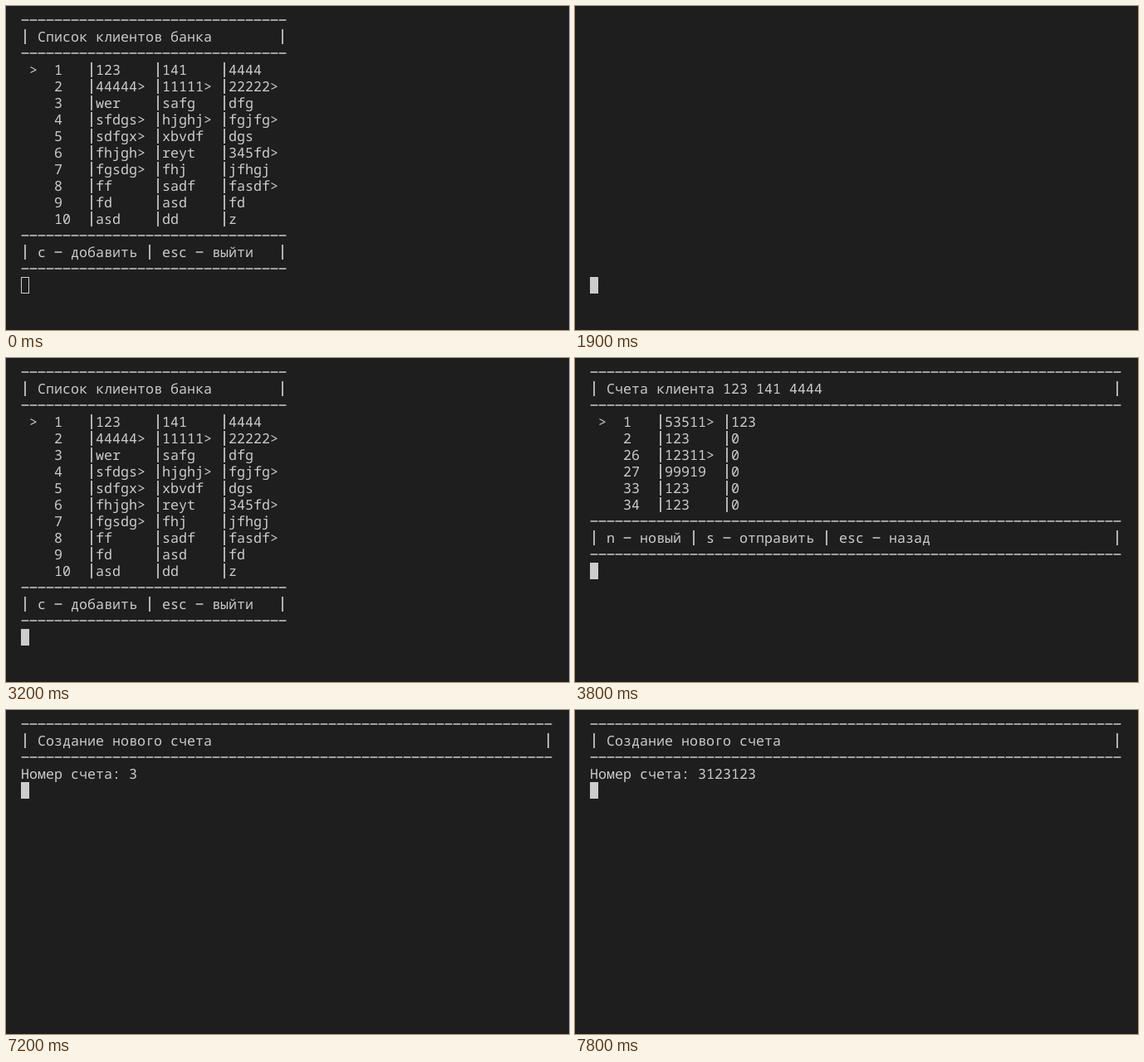
Write an HTML page that moves like this. It is 678 by 391 pixels and loops after 8 s.

```html
<!DOCTYPE html>
<html lang="ru">
<head>
<meta charset="utf-8">
<title>Терминал</title>
<style>
  html, body { margin: 0; width: 100%; height: 100%; overflow: hidden; background: #1e1e1e; }
  svg { display: block; width: 678px; height: 391px; }
  text { font: 16.667px "Noto Sans Mono", "DejaVu Sans Mono", monospace; fill: #ccc; text-rendering: geometricPrecision; }
  path { fill: none; stroke: #ccc; stroke-width: 1.7; }
  g, #cursor { animation: 8s step-end infinite; }

  #list { animation-name: list; }
  #marker { animation-name: marker; }
  #accounts { animation-name: accounts; }
  #form { animation-name: form; }
  #key1 { animation-name: key1; }
  #key2 { animation-name: key2; }
  #key3 { animation-name: key3; }
  #key4 { animation-name: key4; }
  #cursor { stroke: #ccc; animation-name: cursor; }

  @keyframes list {
    0%, 25% { opacity: 1; }
    23.75%, 47.5%, 100% { opacity: 0; }
  }
  @keyframes marker {
    0%, 40%, 100% { transform: none; }
    25% { transform: translateY(20px); }
  }
  @keyframes accounts {
    0%, 75%, 100% { opacity: 0; }
    47.5% { opacity: 1; }
  }
  @keyframes form {
    0%, 96.25% { opacity: 0; }
    75%, 97.5%, 100% { opacity: 1; }
  }
  @keyframes key1 { 0% { opacity: 0; } 90%, 100% { opacity: 1; } }
  @keyframes key2 { 0% { opacity: 0; } 92.5%, 100% { opacity: 1; } }
  @keyframes key3 { 0% { opacity: 0; } 93.75%, 100% { opacity: 1; } }
  @keyframes key4 { 0% { opacity: 0; } 97.5%, 100% { opacity: 1; } }
  @keyframes cursor {
    0% { transform: translateY(320px); fill: transparent; }
    15% { transform: translateY(320px); fill: #ccc; }
    47.5% { transform: translateY(240px); fill: #ccc; }
    75%, 100% { transform: translateY(80px); fill: #ccc; }
  }
</style>
</head>
<body>
<svg id="screen" viewBox="0 0 678 391"></svg>
<script>
  const LEFT = 18, TOP = 7, CELL = 10, LINE = 20;

  // Words become text on the character grid; dashes and bars become strokes.
  function render(lines, firstRow = 0) {
    let strokes = '', words = '';
    lines.forEach((line, i) => {
      const y = TOP + (firstRow + i) * LINE;
      for (const { 0: part, index } of line.matchAll(/[-|]|[^\s|-]+/g)) {
        const x = LEFT + index * CELL;
        if (part === '-') strokes += `M${x + 0.6} ${y + 10}h8.8`;
        else if (part === '|') strokes += `M${x + 5} ${y + 1}v18`;
        else words += `<text x="${x}" y="${y + 16}">${part.replace('>', '&gt;')}</text>`;
      }
    });
    return `<path d="${strokes}"/>${words}`;
  }

  const group = (id, content) => `<g id="${id}">${content}</g>`;

  function framed(text, width) {
    const rule = '-'.repeat(width);
    return [rule, ('| ' + text).padEnd(width - 1) + '|', rule];
  }

  const table = rows => rows.split('\n').map(row => {
    const [id, ...cells] = row.trim().split(' ');
    return '    ' + id.padEnd(4) + cells.map(c => '|' + c.padEnd(7)).join('');
  });

  const clients = table(`1 123 141 4444
    2 44444> 11111> 22222>
    3 wer safg dfg
    4 sfdgs> hjghj> fgjfg>
    5 sdfgx> xbvdf dgs
    6 fhjgh> reyt 345fd>
    7 fgsdg> fhj jfhgj
    8 ff sadf fasdf>
    9 fd asd fd
    10 asd dd z`);

  const accounts = table(`1 53511> 123
    2 123 0
    26 12311> 0
    27 99919 0
    33 123 0
    34 123 0`);

  const pointer = render([' >'], 3);
  const typed = (id, text, column) => group(id, render([' '.repeat(column) + text], 3));

  document.getElementById('screen').innerHTML =
    group('list', render([
      ...framed('Список клиентов банка', 32),
      ...clients,
      ...framed('c - добавить | esc - выйти', 32)
    ]) + group('marker', pointer)) +
    group('accounts', render([
      ...framed('Счета клиента 123 141 4444', 64),
      ...accounts,
      ...framed('n - новый | s - отправить | esc - назад', 64)
    ]) + pointer) +
    group('form', render([
      ...framed('Создание нового счета', 64),
      'Номер счета:'
    ]) + typed('key1', '3', 13) + typed('key2', '12', 14) +
      typed('key3', '3', 16) + typed('key4', '123', 17)) +
    `<rect id="cursor" x="${LEFT + 0.5}" y="${TOP + 0.5}" width="9" height="19"/>`;
</script>
</body>
</html>
```
